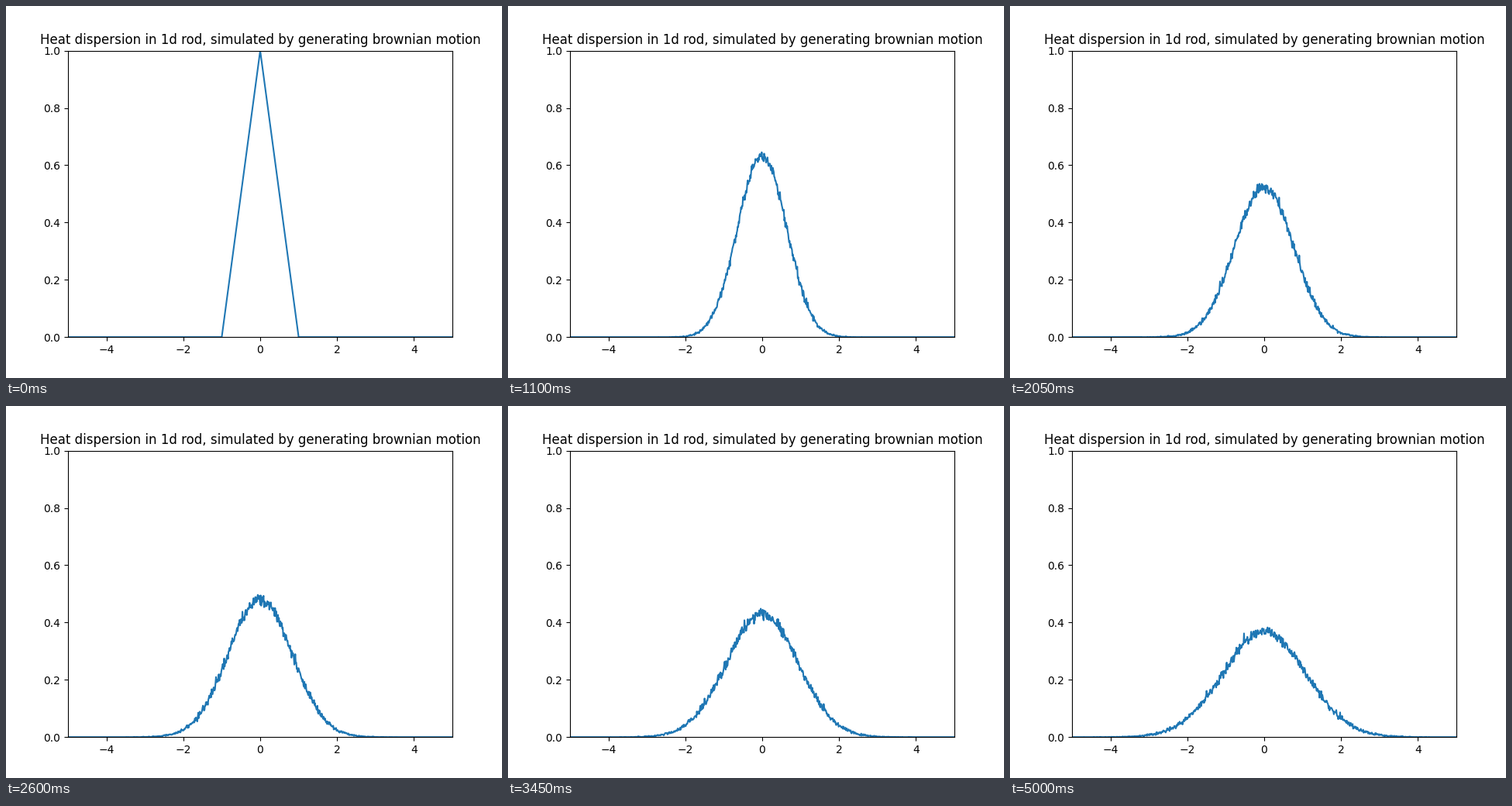
A matplotlib script for the animation above (5.05 s loop, 640 px wide and 480 px high).

```python
import numpy as np
import matplotlib.pyplot as plt
from matplotlib.animation import FuncAnimation

FRAMES = 101
INTERVAL = 50
DT = 0.01
PATHS = 1250
POINTS = 801

rng = np.random.default_rng(7)
x = np.linspace(-5, 5, POINTS)


def initial_heat(pos):
    return np.maximum(0, 1 - np.abs(pos))


def simulate():
    """Average the initial heat over brownian paths started at every x."""
    pos = np.repeat(x[:, None].astype(np.float32), PATHS, axis=1)
    step = np.float32(np.sqrt(DT))
    rows = [initial_heat(x)]
    for _ in range(FRAMES - 1):
        pos += step * rng.standard_normal(pos.shape, dtype=np.float32)
        rows.append(initial_heat(pos).mean(axis=1))
    return rows


heat = simulate()

fig, ax = plt.subplots(figsize=(6.4, 4.8), dpi=100)
ax.set_xlim(-5, 5)
ax.set_ylim(0, 1)
ax.set_title("Heat dispersion in 1d rod, simulated by generating brownian motion")
line, = ax.plot(x, heat[0])


def update(i):
    line.set_ydata(heat[i])
    return line,


anim = FuncAnimation(fig, update, frames=FRAMES, interval=INTERVAL,
                     repeat=True, repeat_delay=0)
plt.show()
```
